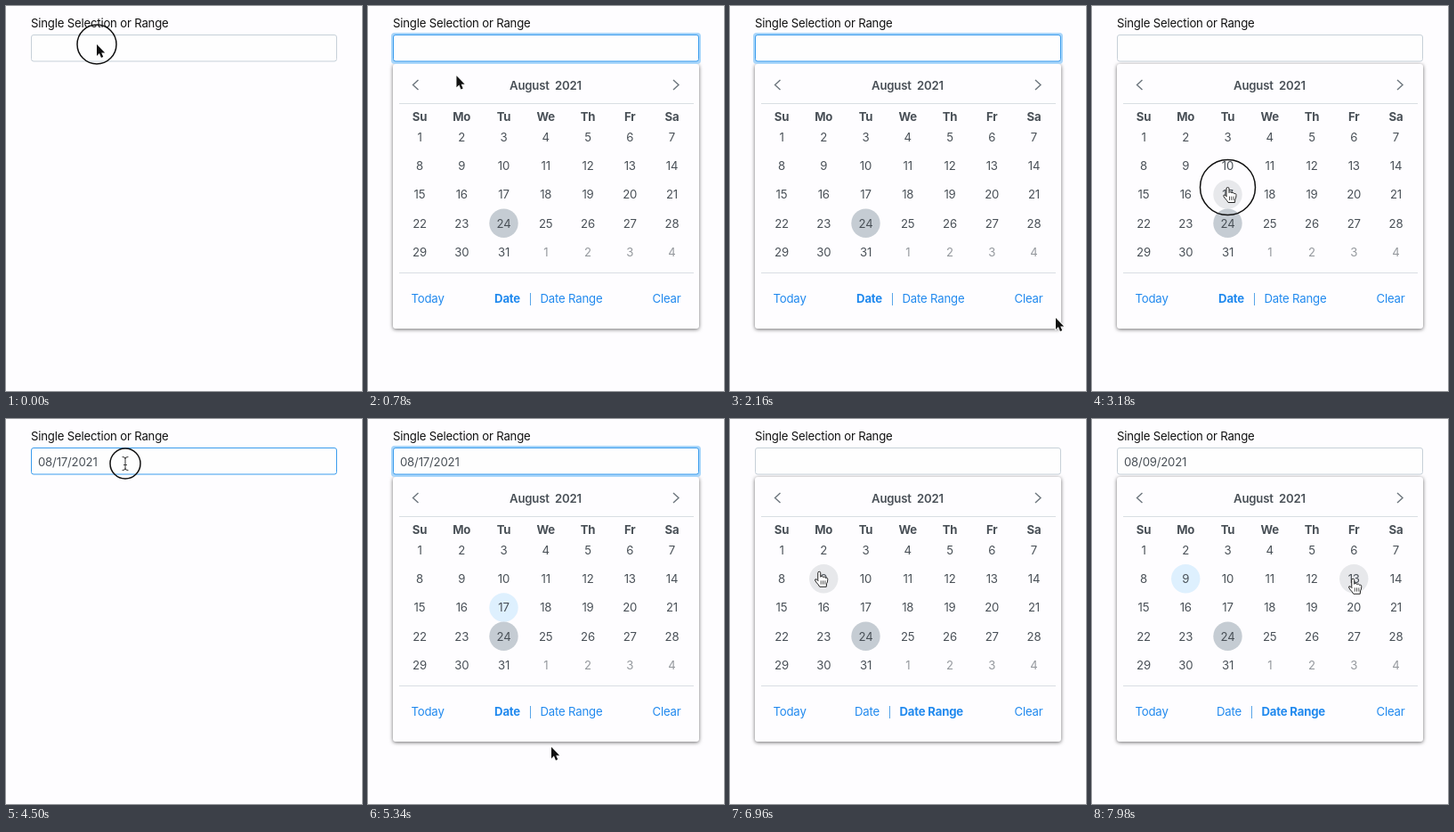
An HTML page with a canvas for the animation above (8 s loop, 400 by 432 pixels).

```html
<!DOCTYPE html>
<html lang="en">
<head>
<meta charset="utf-8">
<title>Date picker</title>
<style>
html, body { margin: 0; width: 100%; height: 100%; overflow: hidden; background: #fefdff; }
canvas { display: block; width: 400px; height: 432px; }
</style>
</head>
<body>
<canvas id="stage"></canvas>
<script>
const W = 400, H = 432, LOOP = 8000, STEP = 60, HOLD = 120;
const canvas = document.getElementById('stage');
const ctx = canvas.getContext('2d');
const dpr = Math.max(1, window.devicePixelRatio || 1);
canvas.width = W * dpr;
canvas.height = H * dpr;

const FONT = 'Inter, Roboto, sans-serif';
const INK = '#495057', LINK = '#2089ee', PAGE = '#fefdff', RULE = '#d9dee3';
const TODAY = 24, MONTH = 31, CELLS = 35;

const clamp = v => Math.max(0, Math.min(1, v));
const ease = v => v * v * (3 - 2 * v);
const colX = c => 58 + c * 47.25;
const rowY = r => 147 + r * 32.25;
const cell = d => ({ x: colX((d - 1) % 7), y: rowY(Math.floor((d - 1) / 7)) });
const near = (d, dx, dy) => ({ x: cell(d).x + dx, y: cell(d).y + dy });

// Each click shows a ring at the pointer
const CLICKS = {
  wake: { at: 0, r: 22 },
  open: { at: 480, r: 23 },
  pick: { at: 3120, r: 31 },
  reopen: { at: 4500, r: 17 },
  range: { at: 5700, r: 27 },
  clear: { at: 6060, r: 32 },
  begin: { at: 7020, r: 27 }
};

// Pointer path: leave, arrive, place
const CLEAR = { x: 337, y: 333 };
const HOME = { x: 102, y: 43 };
const MOVES = [
  [480, 1260, near(2, -11, 3)],
  [1260, 2100, { x: 366, y: 350 }],
  [2160, 3060, near(17, 0, -8)],
  [3240, 3780, { x: 33, y: 42 }],
  [4140, 4260, { x: 134, y: 50 }],
  [4560, 5280, { x: 206, y: 368 }],
  [5340, 5700, { x: 228, y: 329 }],
  [5820, 6060, CLEAR],
  [6180, 6660, near(9, -26, -16)],
  [6840, 6960, near(9, -5, -8)],
  [7080, 7560, CLEAR],
  [7620, 7980, near(13, -1, 0)]
];

const HAND = new Path2D('M-1.5 9V1.5Q-1.5 0 0 0T1.5 1.5V6Q2 5 3.3 5.2Q4.4 5.4 4.5 6.4Q5.3 5.6 6.4 6Q7.2 6.4 7.3 7.2Q8.3 6.7 9 7.2Q9.6 7.8 9.5 9Q9.5 12 8.3 13.5L8 17H.5Q-.5 15-3.5 11.8Q-5.3 9.5-4.4 8.6Q-3 7.9-1.5 10Z');
const FINGERS = new Path2D('M2 10.5V14M4.3 10.5V14M6.6 10.5V14');
const ARROW = new Path2D('M0 0V14L3.2 11L5.4 16.4L7.9 15.3L5.7 10.2H10Z');
const BEAM = new Path2D('M-3-7.5Q0-7.5 0-5.5Q0-7.5 3-7.5M0-5.5V5.5M-3 7.5Q0 7.5 0 5.5Q0 7.5 3 7.5M-1.5 1.5H1.5');

function text(str, x, y, color = INK, weight = 400, align = 'left') {
  ctx.font = `${weight} 13.2px ${FONT}`;
  ctx.letterSpacing = '-0.2px';
  ctx.textAlign = align;
  ctx.fillStyle = color;
  ctx.fillText(str, x, y);
}

function line(color, width, ...pts) {
  ctx.beginPath();
  pts.forEach(([x, y]) => ctx.lineTo(x, y));
  ctx.strokeStyle = color;
  ctx.lineWidth = width;
  ctx.stroke();
}

function box(x, y, w, h, r, color) {
  ctx.beginPath();
  ctx.roundRect(x, y, w, h, r);
  ctx.fillStyle = color;
  ctx.fill();
}

function disc({ x, y }, color) {
  ctx.beginPath();
  ctx.arc(x, y, 16.2, 0, 7);
  ctx.fillStyle = color;
  ctx.fill();
}

function pointerAt(t) {
  let p = HOME;
  for (const [leave, arrive, to] of MOVES) {
    const k = ease(clamp((t - leave) / (arrive - leave)));
    p = { x: p.x + (to.x - p.x) * k, y: p.y + (to.y - p.y) * k };
  }
  return p;
}

function stateAt(t) {
  const { open, pick, reopen, range, clear, begin } = CLICKS;
  const between = (a, b) => t >= a && t < b;
  const fade = at => clamp((t - at) / HOLD);
  const picked = between(pick.at + HOLD, clear.at + STEP) ? 17 : t >= begin.at ? 9 : 0;
  return {
    p: pointerAt(t),
    shown: fade(open.at) - fade(pick.at + HOLD) + fade(reopen.at),
    focus: between(open.at, pick.at) || between(reopen.at + STEP, range.at),
    over: between(3840, reopen.at + STEP),
    picked,
    value: picked ? `08/${String(picked).padStart(2, '0')}/2021` : '',
    range: t >= range.at + STEP
  };
}

function dayNear(p, reach) {
  for (let d = 1; d <= CELLS; d++) {
    const c = cell(d);
    if (Math.hypot(p.x - c.x, p.y - c.y) < reach) return d;
  }
  return 0;
}

function drawField(s) {
  text('Single Selection or Range', 28, 23.5, '#111');
  if (s.focus) box(26, 30, 348, 35, 4, '#a9d6fa');
  box(28.5, 32.5, 343, 29.5, 2.5, '#fefefe');
  ctx.strokeStyle = s.focus || s.over ? '#3a9ced' : '#c6d0d8';
  ctx.lineWidth = 1;
  ctx.stroke();
  text(s.value, 36, 52.5);
}

function drawDays(s) {
  const hot = dayNear(s.p, 12);
  for (let d = 1; d <= CELLS; d++) {
    const c = cell(d), other = d > MONTH;
    if (d === TODAY) disc(c, '#c5ccd3');
    else if (d === s.picked) disc(c, '#def0fe');
    else if (d === hot && !other) disc(c, '#e7e8eb');
    text(other ? d - MONTH : d, c.x, c.y + 4.8, other ? '#94989d' : INK, 400, 'center');
  }
}

function drawFooter(range) {
  const bar = range ? 179.5 : 182.5;
  text('Today', 48.5, 333, LINK);
  text('Date', bar - 11.5, 333, LINK, range ? 400 : 700, 'right');
  line('#58a5e8', 1, [bar, 322], [bar, 336]);
  text('Date Range', bar + 11, 333, LINK, range ? 700 : 400);
  text('Clear', 319.5, 333, LINK);
}

function drawPanel(s) {
  if (!s.shown) return;
  ctx.save();
  ctx.globalAlpha = s.shown;
  ctx.translate(0, 65);
  ctx.scale(1, 0.8 + 0.2 * s.shown);
  ctx.translate(0, -65);

  ctx.save();
  ctx.shadowColor = 'rgba(0,0,0,.58)';
  ctx.shadowBlur = 4 * dpr;
  ctx.shadowOffsetY = dpr;
  box(28, 65, 344, 297, 3, PAGE);
  ctx.restore();

  line('#6c757d', 1.4, [56.5, 83], [50.5, 88.5], [56.5, 94]);
  line('#6c757d', 1.4, [343, 83], [349, 88.5], [343, 94]);
  text('August', 159, 94, INK, 600);
  text('2021', 210, 94, INK, 600);
  for (const y of [109.5, 299.5]) line(RULE, 1, [35, y], [366, y]);
  ['Su', 'Mo', 'Tu', 'We', 'Th', 'Fr', 'Sa'].forEach((name, c) =>
    text(name, colX(c), 128.5, INK, 700, 'center'));
  drawDays(s);
  drawFooter(s.range);
  ctx.restore();
}

function pointerKind(t, s) {
  const { x, y } = s.p;
  if (t < CLICKS.open.at) return 'arrow';
  if (y > 32 && y < 63) return 'beam';
  const onLink = x > 138 && x < 356 && y > 316 && y < 342;
  return s.shown > 0.5 && (onLink || dayNear(s.p, 17)) ? 'hand' : 'arrow';
}

function outline(path, color, width) {
  ctx.strokeStyle = color;
  ctx.lineWidth = width;
  ctx.stroke(path);
}

function drawPointer(kind, p) {
  ctx.save();
  ctx.translate(p.x, p.y);
  ctx.lineJoin = ctx.lineCap = 'round';
  if (kind === 'arrow') {
    ctx.scale(0.92, 0.92);
    outline(ARROW, '#fff', 2);
    ctx.fillStyle = '#111';
    ctx.fill(ARROW);
  } else if (kind === 'hand') {
    ctx.fillStyle = '#fff';
    ctx.fill(HAND);
    outline(HAND, '#222', 1);
    outline(FINGERS, '#222', 0.8);
  } else {
    outline(BEAM, '#333', 1);
  }
  ctx.restore();
}

function drawRings(t) {
  for (const { at, r } of Object.values(CLICKS)) {
    if (t < at || t >= at + HOLD) continue;
    const p = pointerAt(at);
    ctx.beginPath();
    ctx.arc(p.x, p.y, r, 0, 7);
    ctx.strokeStyle = '#111';
    ctx.lineWidth = 1.5;
    ctx.stroke();
  }
}

function draw(now) {
  const t = Math.floor((now % LOOP) / STEP) * STEP;
  const s = stateAt(t);
  ctx.setTransform(dpr, 0, 0, dpr, 0, 0);
  ctx.fillStyle = PAGE;
  ctx.fillRect(0, 0, W, H);
  drawPanel(s);
  drawField(s);
  drawPointer(pointerKind(t, s), s.p);
  drawRings(t);
}

const start = performance.now();
function tick() {
  draw(performance.now() - start);
  requestAnimationFrame(tick);
}
tick();
</script>
</body>
</html>
```
